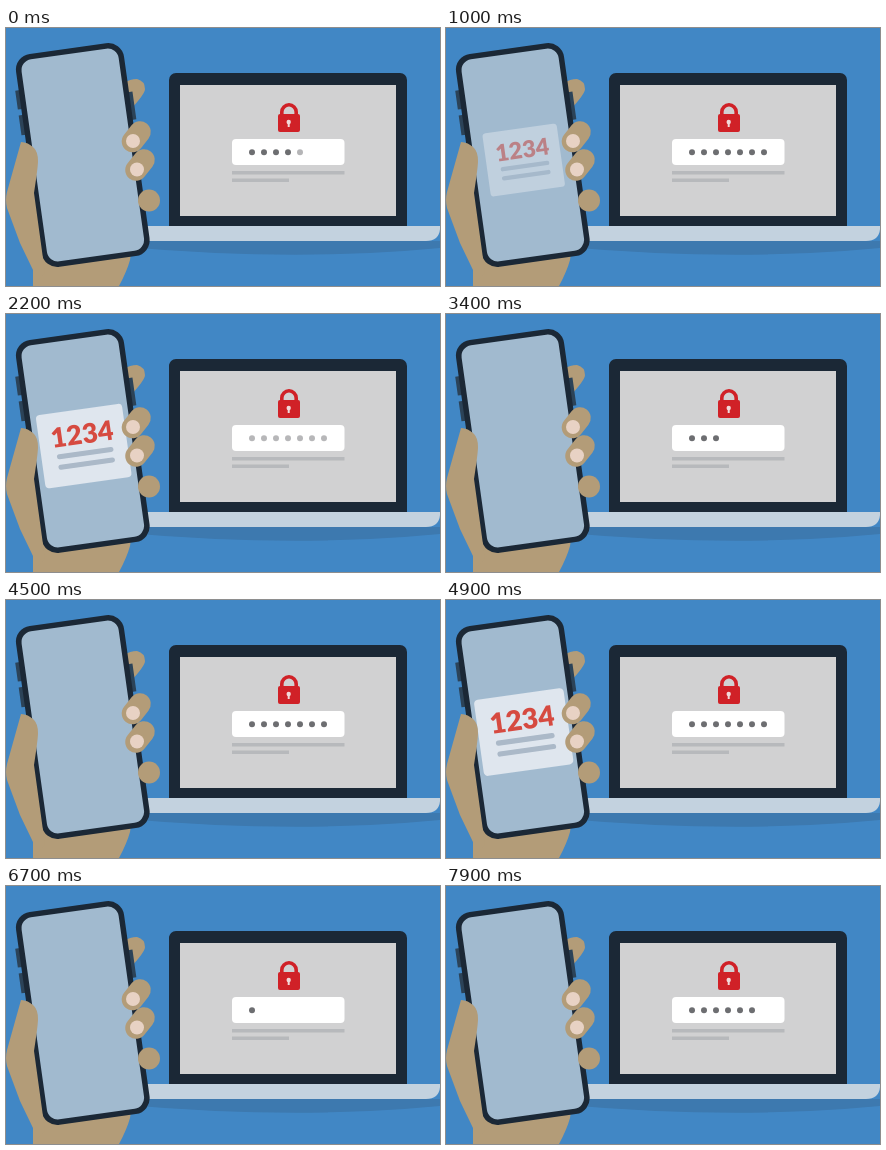
Animation of 434 by 258 pixels, one loop 8000 ms. Source, as an HTML page:

```html
<!DOCTYPE html>
<html lang="en">
<head>
<meta charset="utf-8">
<title>One-time code</title>
<style>
html, body { margin: 0; width: 100%; height: 100%; overflow: hidden; background: #4187c5; }
svg { display: block; width: 434px; height: 258px; }
text { font: 900 27px Lato, sans-serif; text-anchor: middle; fill: #d64a40; }
</style>
</head>
<body>
<svg viewBox="0 0 434 258">
  <rect width="434" height="258" fill="#4187c5"/>

  <g id="laptop">
    <path d="M120 213H434V220Q290 234 120 219Z" fill="#3d79af"/>
    <path d="M163 199V52a7 7 0 0 1 7-7H394a7 7 0 0 1 7 7V199Z" fill="#1b2836"/>
    <path d="M174 57H390V188H174Z" fill="#d1d1d2"/>
    <path d="M110 198H434V201Q433 213 420 213H110Z" fill="#c3d2df"/>
    <path d="M275.8 88V84a7.2 7.2 0 0 1 14.4 0V88" fill="none" stroke="#d02127" stroke-width="3.6"/>
    <rect x="272" y="86" width="22" height="18" rx="2" fill="#d02127"/>
    <path d="M282.7 94V99" stroke="#f1d9da" stroke-width="2"/>
    <circle cx="282.7" cy="94" r="2.2" fill="#f1d9da"/>
    <rect x="226" y="111" width="112.5" height="26" rx="4" fill="#fff"/>
    <path d="M226 144.8H338.5M226 152.3H283" stroke="#b7b9bc" stroke-width="3.4"/>
    <g id="dots" fill="#6d6e71"></g>
  </g>

  <path d="M27 258V205H128L124 232Q121 243 113 258ZM118 55Q124 51 131 51Q139 53 139 61Q139 66 124 82Z" fill="#b39c78"/>

  <g id="phone" transform="translate(76.8 127) rotate(-8)">
    <path d="M-55.5-73V-54M-55.5-48V-28M55.5-56V-28" stroke="#2c4358" stroke-width="5"/>
    <rect x="-54.5" y="-107.5" width="109" height="215" rx="16" fill="#1b2836"/>
    <rect x="-49" y="-102" width="98" height="204" rx="11" fill="#a1bacf"/>
    <g id="card">
      <rect x="-43.5" y="-37" width="87" height="74" rx="4" fill="#dfe6ee"/>
      <text x="0" y="-2.4">1234</text>
      <path d="M-25.5 7.2H26.5M-25.5 17.8H26.5" stroke="#abb9c8" stroke-width="5" stroke-linecap="round"/>
    </g>
  </g>

  <g id="hand" fill="#b39c78">
    <path d="M15 114Q22 114 28 120Q32 124 32 133Q32 139 28 165L39 245L27 258V242L14 215L1 180Q-1 172 1 164Z"/>
    <path d="M134 104L126.500 113.500M138 132L130 142" stroke="#b39c78" stroke-width="21.500" stroke-linecap="round"/>
    <circle cx="143" cy="172.500" r="11"/>
    <circle cx="127" cy="113" r="7" fill="#e8d2c4"/>
    <circle cx="131" cy="141.500" r="7" fill="#e8d2c4"/>
  </g>
</svg>
<script>
const LOOP = 8000, CYCLE = 3800, LEAD = 1020;
const card = document.getElementById('card');
const dotGroup = document.getElementById('dots');
const clamp = v => Math.max(0, Math.min(1, v));

const dots = Array.from({ length: 7 }, (_, i) => {
  const dot = document.createElementNS('http://www.w3.org/2000/svg', 'circle');
  dot.setAttribute('cx', 246 + 12 * i);
  dot.setAttribute('cy', 124.2);
  dot.setAttribute('r', 3);
  return dotGroup.appendChild(dot);
});

// Linear interpolation through [time, value] keys
function track(keys, t) {
  const next = keys.findIndex(key => key[0] > t);
  if (next === 0) return keys[0][1];
  if (next < 0) return keys[keys.length - 1][1];
  const [t0, v0] = keys[next - 1], [t1, v1] = keys[next];
  return v0 + (v1 - v0) * (t - t0) / (t1 - t0);
}

const cardScale = [[1920, .7], [2020, .86], [2120, 1.04], [2240, 1], [3280, 1], [3360, 1.04], [3560, .7]];
const cardOpacity = [[1920, 0], [2120, 1], [3360, 1], [3560, 0]];

function draw(now) {
  const t = (now % LOOP + LEAD) % CYCLE;
  const fadeOut = 1 - clamp((t - 3130) / 180);
  dots.forEach((dot, i) => dot.setAttribute('opacity', clamp((t - 240 * i) / 120) * fadeOut));
  card.setAttribute('opacity', track(cardOpacity, t));
  card.setAttribute('transform', `translate(.2 5.1) scale(${track(cardScale, t)})`);
}

const start = performance.now();
function tick() {
  draw(performance.now() - start);
  requestAnimationFrame(tick);
}
tick();
</script>
</body>
</html>
```
